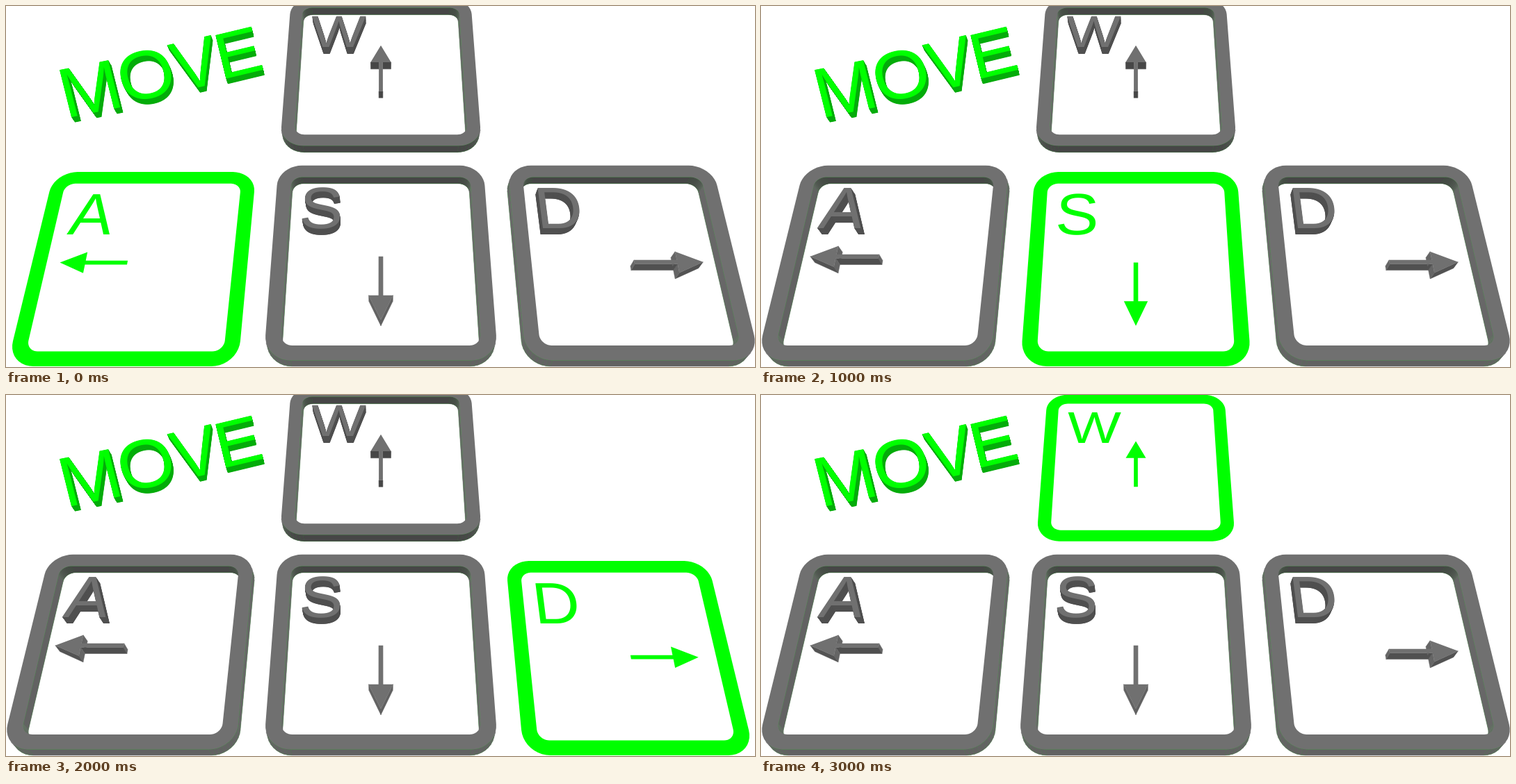
An HTML page with a canvas that plays this animation: 1077 by 520 pixels, repeating every 4000 ms.

```html
<!DOCTYPE html>
<html lang="en">
<head>
<meta charset="utf-8">
<title>Move keys</title>
<style>
  html, body { margin: 0; width: 100%; height: 100%; overflow: hidden; background: #fff; }
  canvas { display: block; }
</style>
</head>
<body>
<canvas id="stage" width="1077" height="520"></canvas>
<script>
const ctx = document.getElementById('stage').getContext('2d');
const CX = 539, PITCH = 1.118, SPREAD = .0145, GREEN = '#00ff00', GREY = '#707070';

// Keys in the order they light up; positions are in key sides.
const keys = [
  { ch: 'A', col: -1, row: 1, mid: .233, tip: [.129, .5], dir: [-1, 0] },
  { ch: 'S', col: 0, row: 1, mid: .2185, tip: [.5, .813], dir: [0, 1] },
  { ch: 'D', col: 1, row: 1, mid: .223, tip: [.85, .529], dir: [1, 0] },
  { ch: 'W', col: 0, row: 0, mid: .27, tip: [.5, .343], dir: [0, -1] }
];

// Title letters: text matrix a, b, c, d and centre x, y.
const title = [
  ['M', 1.046, -.209, .247, .988, 120.5, 119],
  ['O', 1.03, -.22, .24, .96, 201, 99],
  ['V', .96, -.22, .26, .975, 272, 82.5],
  ['E', .98, -.235, .22, .91, 333.6, 67.3]
];

// Floor plane to screen.
function project([u, v]) {
  const q = 1 / (9.003 - v);
  return [CX + 2288.8 * q * u, 15198 * q - 1688.4];
}

// Raise a screen point above the floor; k = 1 is the top face.
const lift = ([x, y], k) => [x + (x - CX) * SPREAD * k, y + (y * .003 - 10) * k];
const setLift = k =>
  ctx.setTransform(1 + SPREAD * k, 0, 0, 1 + .003 * k, -CX * SPREAD * k, -10 * k);

function ring(inset, r) {
  const pts = [], a = inset + r, b = 1 - a;
  [[a, a], [b, a], [b, b], [a, b]].forEach(([x, y], corner) => {
    for (let i = 0; i <= 10; i++) {
      const t = (corner + 2 + i / 10) * Math.PI / 2;
      pts.push([x + r * Math.cos(t), y + r * Math.sin(t)]);
    }
  });
  return pts;
}

function arrow([x, y], [dx, dy]) {
  return [[0, 0], [.118, .054], [.118, .0105], [.313, .0105],
          [.313, -.0105], [.118, -.0105], [.118, -.054]]
    .map(([back, side]) => [x - dx * back - dy * side, y - dy * back + dx * side]);
}

function fillLoops(loops, color) {
  ctx.beginPath();
  for (const loop of loops) {
    loop.forEach((p, i) => i ? ctx.lineTo(...p) : ctx.moveTo(...p));
    ctx.closePath();
  }
  ctx.fillStyle = color;
  ctx.fill('evenodd');
}

function drawWalls(loop) {
  loop.forEach((a, i) => {
    const b = loop[(i + 1) % loop.length];
    const nx = b[1] - a[1], ny = a[0] - b[0], len = Math.hypot(nx, ny);
    const top = lift(a, 1);
    if (!len || nx * (top[0] - a[0]) + ny * (top[1] - a[1]) >= 0) return;
    const front = 70 + Math.max(0, a[1] - 300) * .13;
    const shade = Math.round(106 + (front - 106) * Math.abs(ny) / len);
    const color = `rgb(${shade},${shade},${shade})`;
    fillLoops([[a, b, lift(b, 1), top]], color);
    ctx.strokeStyle = color;
    ctx.lineWidth = .5;
    ctx.stroke();
  });
}

function drawSolid(loops) {
  loops.forEach(drawWalls);
  fillLoops(loops.map(loop => loop.map(p => lift(p, 1))), GREY);
}

function drawLetter(ch, matrix, k, color) {
  setLift(k);
  ctx.transform(...matrix);
  ctx.fillStyle = color;
  ctx.fillText(ch, 0, 34.4);
  ctx.resetTransform();
}

function drawSolidLetter(ch, matrix, from, to, side, face) {
  for (let i = 0; i < 20; i++) drawLetter(ch, matrix, from + (to - from) * i / 20, side);
  drawLetter(ch, matrix, to, face);
}

// Affine text matrix that follows the floor around a point.
function floorMatrix(u, v) {
  const e = .1, sx = .00311 / (2 * e), sy = .00323 / (2 * e);
  const [l, r, t, b] = [[u - e, v], [u + e, v], [u, v - e], [u, v + e]].map(project);
  return [(r[0] - l[0]) * sx, (r[1] - l[1]) * sx, (b[0] - t[0]) * sy, (b[1] - t[1]) * sy,
          ...project([u, v])];
}

for (const key of keys) {
  const u = key.col * PITCH - .5, v = key.row * PITCH;
  const place = pts => pts.map(([x, y]) => project([u + x, v + y]));
  key.frame = [place(ring(0, .115)), place(ring(.068, .05)).reverse()];
  key.arrow = [place(arrow(key.tip, key.dir))];
  key.matrix = floorMatrix(u + key.mid, v + .243);
}

function drawKey(key, lit) {
  fillLoops(key.frame, GREEN);
  if (lit) {
    fillLoops(key.arrow, GREEN);
    drawLetter(key.ch, key.matrix, 0, GREEN);
  } else {
    drawSolid(key.frame);
    drawSolid(key.arrow);
    drawSolidLetter(key.ch, key.matrix, 0, 1, '#505050', GREY);
  }
}

function draw(now) {
  const active = Math.floor(now / 1000) % keys.length;
  ctx.resetTransform();
  ctx.fillStyle = '#fff';
  ctx.fillRect(0, 0, 1077, 520);
  ctx.font = '100px "Liberation Sans", Arial, sans-serif';
  ctx.textAlign = 'center';
  for (const [ch, ...matrix] of title) drawSolidLetter(ch, matrix, -.8, 0, '#06ac0c', GREEN);
  keys.forEach((key, i) => drawKey(key, i === active));
  requestAnimationFrame(draw);
}
requestAnimationFrame(draw);
</script>
</body>
</html>
```
